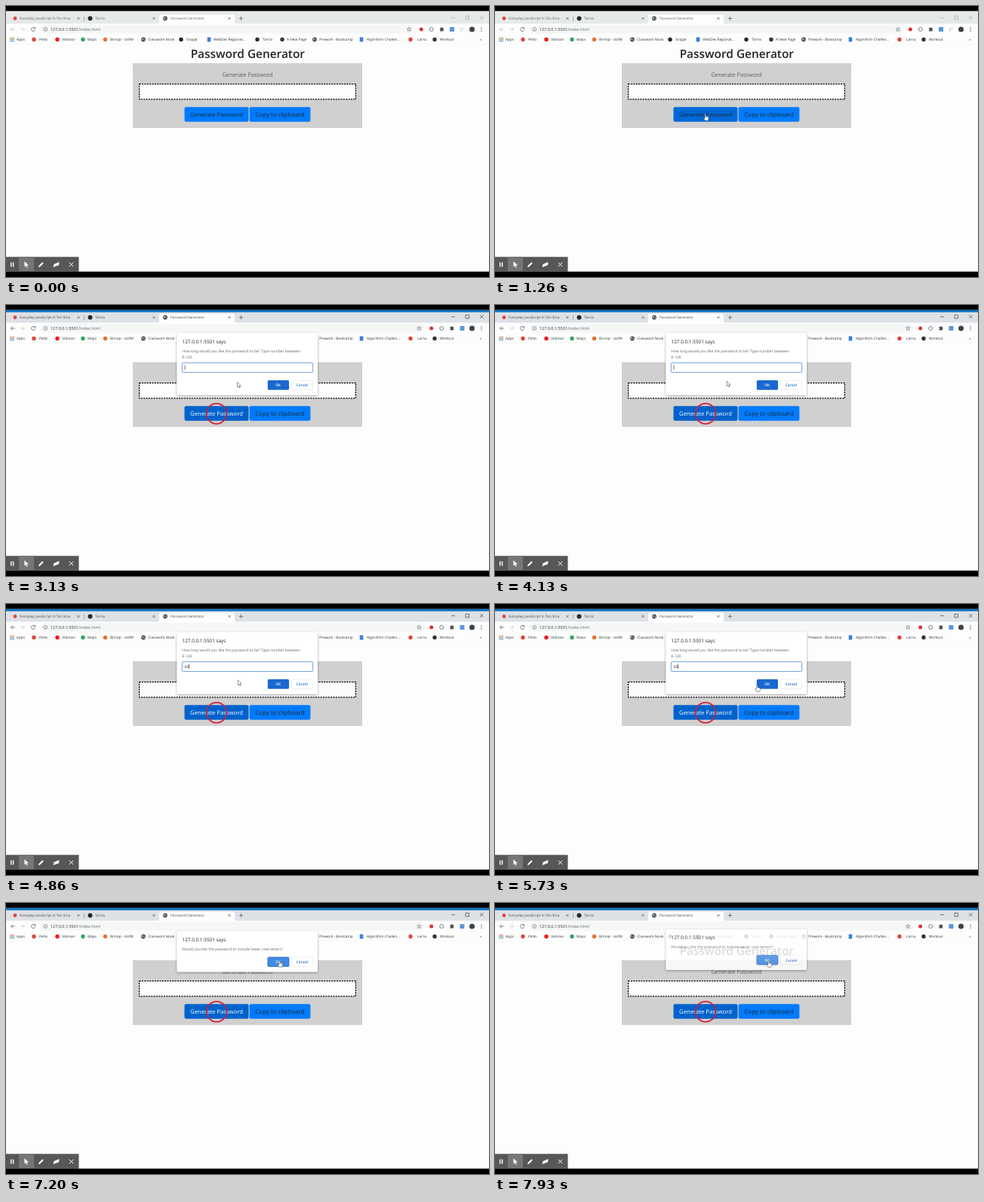
Animation, 640 px wide and 360 px high, one loop 8000 ms. Source, as an HTML page:

```html
<!DOCTYPE html>
<html lang="en">
<head>
<meta charset="utf-8">
<title>Password Generator</title>
<style>
  html, body { margin: 0; width: 100%; height: 100%; overflow: hidden; background: #fdfdfd; }
  svg { display: block; width: 100vw; height: 100vh; }
  text { font-family: "Open Sans", "Noto Sans", sans-serif; text-rendering: geometricPrecision; }
  .mid { text-anchor: middle; }
  .line { fill: none; stroke: #5f6368; stroke-width: .8; }
</style>
</head>
<body>
<svg viewBox="0 0 640 360">
  <defs>
    <filter id="shadow" x="-10%" y="-10%" width="120%" height="130%">
      <feDropShadow dx="0" dy="1" stdDeviation="1.6" flood-opacity=".4"/>
    </filter>
    <g id="globe">
      <circle r="2.9" fill="#4d5156"/>
      <path d="M-2 -1 L-.3 -1.3 L-.2 .1 L-1.2 .6Z M.7 .4 L2 0 L1.2 1.8Z" fill="#fff"/>
    </g>
    <path id="cross" class="line" d="M-1.6 -1.6 L1.6 1.6 M1.6 -1.6 L-1.6 1.6"/>
  </defs>

  <rect width="640" height="360" fill="#fdfdfd"/>

  <!-- browser frame -->
  <rect id="strip" y="6.7" width="640" height="17.300"/>
  <rect width="640" height="6.7"/>
  <rect id="edge" y="6.7" width="640" height="2.9" fill="#0b70c0"/>
  <path d="M200 24 Q203 24 203 21 V14 Q203 11.5 205.500 11.5 H300.500 Q303 11.5 303 14 V21 Q303 24 306 24Z" fill="#fdfdfd"/>
  <rect y="23.500" width="640" height="27.500" fill="#fdfdfd"/>
  <rect y="50.800" width="640" height=".4" fill="#eceeee"/>
  <path class="line" d="M103.500 13.500 V20" style="stroke-width:.5"/>
  <circle cx="12" cy="16.500" r="2.4" fill="#e0443e"/>
  <circle cx="111.500" cy="16.500" r="3" fill="#24292e"/>
  <use href="#globe" x="211" y="16.500"/>
  <g id="tabs" font-size="4.7" fill="#45494d"></g>
  <use href="#cross" x="96" y="16.500"/>
  <use href="#cross" x="196" y="16.500"/>
  <use href="#cross" x="296" y="16.500"/>
  <path class="line" d="M308.800 16.500 H314.200 M311.500 13.800 V19.200"/>
  <path id="controls" d="M590 15.700 H595 M609 13.300 H613.500 V17.800 H609Z M628 13.300 L632.600 17.900 M632.600 13.300 L628 17.900" fill="none" stroke="#222" stroke-width=".6"/>

  <!-- address bar -->
  <path id="back" class="line" d="M12 31 H6.500 M9 28.500 L6.500 31 L9 33.500"/>
  <path class="line" d="M19 31 H24.500 M22 28.500 L24.500 31 L22 33.500" style="stroke:#c8cbce"/>
  <path class="line" d="M38.200 29.300 A2.600 2.600 0 1 0 38.700 31.600 M38.700 28 V30 H36.600"/>
  <rect id="omni" x="45" y="25.300" height="11.500" rx="5.7" fill="#f5f7f7"/>
  <circle class="line" cx="52.300" cy="31" r="2.4" style="stroke-width:.6"/>
  <path class="line" d="M52.300 30.700 V32.400 M52.300 29.400 V29.900" style="stroke-width:.6"/>
  <text x="59" y="33" font-size="5.45" fill="#2a2d31">127.0.0.1:5501<tspan fill="#666a6e">/index.html</tspan></text>
  <path id="queue" class="line" style="stroke:#b5babc;stroke-width:.6" d="M601.500 29.300 H607 M601.500 31.200 H605 M601.500 33 H604"/>
  <g id="tools">
    <path class="line" style="stroke-width:.6" transform="translate(534 31)" d="M0 -2.8 L.8 -.9 L2.8 -.8 L1.200 .5 L1.800 2.500 L0 1.400 L-1.800 2.500 L-1.200 .5 L-2.800 -.8 L-.8 -.9Z"/>
    <circle cx="550.300" cy="31" r="2.5" fill="#e02f2f"/>
    <circle class="line" cx="563.800" cy="31" r="2.500"/>
    <path transform="translate(577.500 30.500)" fill="#4d5156" d="M-2.5 -1.6 H-.9 A1 1 0 0 1 1 -1.6 H2 V0 A.9 .9 0 0 1 2 1.6 V3 H-2.5 V1.6 A.8 .8 0 0 0 -2.5 0Z"/>
    <rect x="588" y="28" width="6" height="6" rx=".6" fill="#5a96de"/>
  </g>
  <circle cx="617.500" cy="31" r="3.5" fill="#3c4347"/>
  <g fill="#5f6368"><circle cx="630" cy="28.800" r=".7"/><circle cx="630" cy="31" r=".7"/><circle cx="630" cy="33.200" r=".7"/></g>

  <!-- bookmarks -->
  <g fill="none" stroke-width="1.300" stroke-dasharray="1.400 .6">
    <path d="M5.500 42.600 H11" stroke="#d9574c"/>
    <path d="M5.500 44.600 H11" stroke="#4a9a5e"/>
    <path d="M5.500 46.600 H11" stroke="#4a83dc"/>
  </g>
  <g id="marks" font-size="4.7" fill="#2c3034"></g>

  <!-- page -->
  <text class="mid" x="320.300" y="69" font-size="15.400" font-weight="600" fill="#212529">Password Generator</text>
  <rect x="168" y="76" width="304" height="86" fill="#d0d0d0"/>
  <text class="mid" x="320" y="94" font-size="7.65" font-weight="300" fill="#212529">Generate Password</text>
  <rect x="176.600" y="103.600" width="286.800" height="20.300" fill="#fdfdfd" stroke="#000" stroke-width="1.250" stroke-dasharray="2.100 1.250"/>
  <rect id="gen" x="236.500" y="134.200" width="85" height="19.600" rx="2"/>
  <text id="genText" class="mid" x="279" y="147.300" font-size="7.7">Generate Password</text>
  <rect x="322.600" y="134.200" width="80.800" height="19.600" rx="2" fill="#007bff"/>
  <text class="mid" x="363" y="147.300" font-size="8" fill="#212529">Copy to clipboard</text>
  <circle id="ring" cx="279" cy="144.300" r="13.500" fill="none" stroke="#d3203a" stroke-width="1.700"/>

  <!-- dialog -->
  <g id="dialog">
    <rect id="box" x="226.500" y="37.500" width="186.500" rx="1.200" fill="#fff" filter="url(#shadow)"/>
    <text x="233.500" y="50.700" font-size="6.4" fill="#202124">127.0.0.1:5501 says</text>
    <text id="ask" x="233.300" y="62.800" font-size="4.95" fill="#5f6368"></text>
    <g id="field">
      <text x="233.300" y="71" font-size="4.95" fill="#5f6368">8-128.</text>
      <rect x="233.400" y="76.800" width="173.200" height="12.800" rx="1" fill="#fff" stroke="#5f97d6" stroke-width=".9"/>
      <text id="typed" x="236.700" y="85" font-size="4.95" fill="#202124"></text>
      <rect id="caret" y="80" width=".6" height="6.200" fill="#222"/>
    </g>
    <g id="buttons">
      <rect id="ok" x="346.800" y="-6.300" width="28.200" height="12.600" rx="1.500"/>
      <text class="mid" x="360.700" y="1.800" font-size="4.8" font-weight="600" fill="#fff">OK</text>
      <rect x="378.300" y="-6.200" width="28.300" height="12.400" rx="1.500" fill="#fff" stroke="#dadce0" stroke-width=".5"/>
      <text class="mid" x="392.500" y="1.800" font-size="4.8" font-weight="600" fill="#1f6bcb">Cancel</text>
    </g>
  </g>

  <!-- recorder tools -->
  <rect y="333.300" width="96.500" height="19.500" fill="#575757"/>
  <rect x="17" y="333.300" width="20" height="19.500" fill="#767676"/>
  <path d="M6.700 340.500 V346.500 M9.600 340.500 V346.500" stroke="#fff" stroke-width="1.400"/>
  <path d="M24.300 339.300 L30 344.200 L27.500 344.500 L28.800 347.300 L27.700 347.800 L26.400 345 L24.600 346.600Z" fill="#fff"/>
  <path d="M43 347 L43.500 345 L48.300 340.200 L49.800 341.700 L45 346.500Z M62.500 347 L63.500 343 L70.500 340 L70 344.300Z" fill="#fff"/>
  <path d="M83.800 340.700 L89.200 346.100 M89.200 340.700 L83.800 346.100" stroke="#fff" stroke-width="1"/>
  <rect y="352.800" width="640" height="7.200"/>

  <g id="cursor" fill="#fff" stroke="#333" stroke-width=".5" stroke-linejoin="round">
    <path id="arrow" d="M0 0 V6.800 L1.600 5.400 L2.700 7.900 L3.800 7.400 L2.700 5 H4.900Z"/>
    <path id="hand" d="M-.7 .6 Q0 -.5 .7 .6 V3.300 Q1.400 2.800 1.900 3.500 Q2.600 3 3 3.800 Q3.800 3.500 4 4.400 V6.300 Q3.700 7.600 3.200 8.700 H-.5 Q-1.300 7.200 -2.700 5.400 Q-2.300 4.300 -.7 5.600Z"/>
  </g>
</svg>
<script>
const LOOP = 8000, CLICK = 1930;
const $ = id => document.getElementById(id);
const set = (id, attrs) => { for (const k in attrs) $(id).setAttribute(k, attrs[k]); };
const show = (id, on) => { $(id).style.display = on ? "" : "none"; };
const clamp = v => Math.max(0, Math.min(1, v));
const within = (t, a, b) => t >= a && t < b;

function add(parent, tag, attrs, text = "") {
  const el = document.createElementNS("http://www.w3.org/2000/svg", tag);
  for (const k in attrs) el.setAttribute(k, attrs[k]);
  el.textContent = text;
  $(parent).append(el);
}

[[18, "Everyday JavaScript In Ten Sma"], [118, "Tarnix"], [218, "Password Generator"]]
  .forEach(([x, label]) => add("tabs", "text", { x, y: 18.3 }, label));

// icon x, text x, label, icon colour, icon kind
[
  [8, 14, "Apps"],
  [37, 44, "Pelto", "#d9483b", "dot"],
  [68, 74.3, "Vidnoor", "#f01818", "dot"],
  [102, 108, "Maps", "#35a162", "dot"],
  [131.5, 138, "Brinop - UofM", "#e8702a", "dot"],
  [182, 188.3, "Classwork Nook", "", "globe"],
  [232, 239, "Snipjar", "#222", "dot"],
  [269, 275.3, "WebDev Regional...", "#3b7de0", "page"],
  [333, 340, "Tarnix", "#24292e", "dot"],
  [366, 372, "A Neat Page", "#333", "dot"],
  [409, 415.3, "Prework - Bootcamp", "", "globe"],
  [471, 478, "Algorithim Challen...", "#3b7de0", "page"],
  [536, 545, "Larnu", "#e0443e", "dot"],
  [568, 574.7, "Workout", "#333", "dot"],
  [0, 628, "»"]
].forEach(([ix, x, label, fill, kind]) => {
  if (kind === "dot") add("marks", "circle", { cx: ix, cy: 44.5, r: 2.7, fill });
  if (kind === "page") add("marks", "rect", { x: ix - 2.3, y: 41.6, width: 4.6, height: 5.8, rx: .5, fill });
  if (kind === "globe") add("marks", "use", { href: "#globe", x: ix, y: 44.5 });
  add("marks", "text", { x, y: 46.2 }, label);
});

const dialogs = [
  { from: 2015, to: 5850, ask: "How long would you like the password to be? Type number between", prompt: true },
  { from: 6010, to: 7560, ask: "Would you like the password to include lower case letters?" },
  { from: 7780, to: 9000, ask: "Would you like the password to include upper case letters?" }
];
const path = [
  [60, 306, 168], [860, 279, 143.5], [2530, 279, 143.5], [3200, 307.3, 101],
  [5130, 307.3, 101], [5800, 348.5, 108], [6500, 348.5, 108], [7200, 362.5, 76.5]
];

function cursorAt(t) {
  let i = path.findIndex(p => p[0] > t);
  if (i < 0) return path.at(-1).slice(1);
  if (i === 0) i = 1;
  const [a, b] = [path[i - 1], path[i]];
  const u = clamp((t - a[0]) / (b[0] - a[0])), e = u * u * (3 - 2 * u);
  return [a[1] + (b[1] - a[1]) * e, a[2] + (b[2] - a[2]) * e];
}

function drawDialog(t) {
  const d = dialogs.find(d => within(t, d.from, d.to + 120));
  show("dialog", d);
  if (!d) return;
  const rest = 1 - clamp((t - d.from) / 250);
  const p = Math.min(1 - rest * rest, 1 - clamp((t - d.to) / 120));
  set("dialog", { opacity: p, transform: `translate(0 ${-16 * (1 - p)})` });
  set("box", { height: d.prompt ? 82.3 : 54 });
  set("buttons", { transform: `translate(0 ${d.prompt ? 106.4 : 78.2})` });
  set("ok", d.prompt ? { fill: "#1a68cf", stroke: "none" }
                     : { fill: "#4189e3", stroke: "#2c66b8", "stroke-width": .7 });
  $("ask").textContent = d.ask;
  show("field", d.prompt);
  const count = (t > 4400) + (t > 4600);
  $("typed").textContent = "65".slice(0, count);
  const blinkFrom = t > 4600 ? 4600 : t > 4400 ? 4400 : d.from;
  show("caret", (t - blinkFrom) % 1000 < 520);
  set("caret", { x: 236.7 + count * 2.83 });
}

function draw(t) {
  const active = t >= CLICK;
  show("edge", active);
  show("queue", !active);
  set("strip", { fill: active ? "#dee1e6" : "#e5eae9" });
  set("tabs", { opacity: active ? 1 : .85 });
  set("controls", { opacity: active ? 1 : .4 });
  set("back", { opacity: active ? 1 : .4 });
  set("omni", { width: active ? 509 : 496 });
  set("tools", { transform: `translate(${active ? 13.4 : 0})` });
  set("gen", { fill: active ? "#0062cc" : t > 400 ? "#0069d9" : "#007bff" });
  set("genText", { fill: active ? "#fff" : "#212529" });
  show("ring", active);
  drawDialog(t);

  const hand = within(t, 400, 2650) || within(t, 5600, 6560) || t >= 6900;
  set("cursor", { transform: `translate(${cursorAt(t)})` });
  show("cursor", t >= 60);
  show("hand", hand);
  show("arrow", !hand);
}

const start = performance.now();
function tick() {
  draw((performance.now() - start) % LOOP);
  requestAnimationFrame(tick);
}
tick();
</script>
</body>
</html>
```
